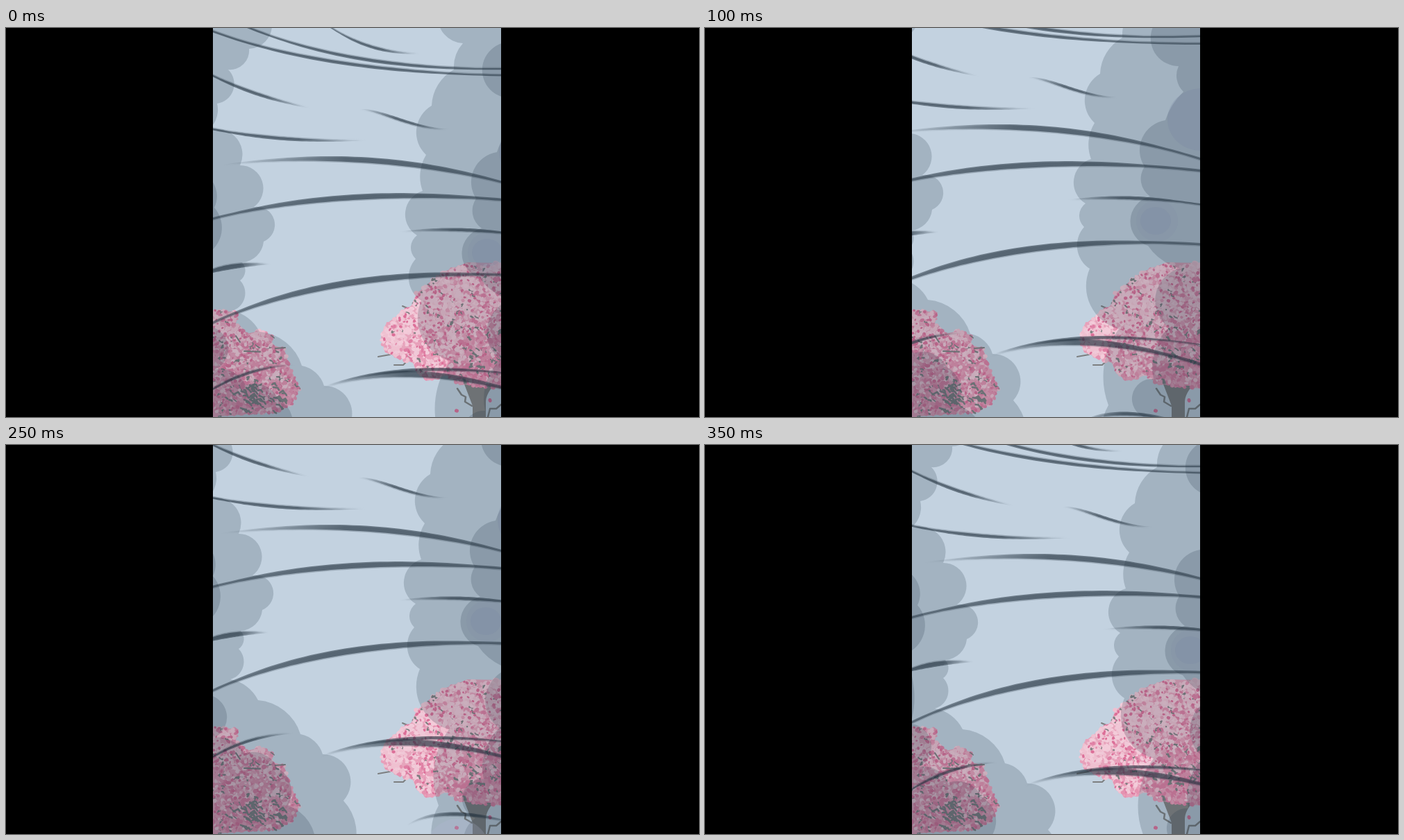
Recreate the animation shown at these times as an HTML page with a canvas. Size 998 by 561 pixels, loop 400 ms.

```html
<!DOCTYPE html>
<html lang="en">
<head>
<meta charset="utf-8">
<title>Wind and blossom</title>
<style>
  html, body { margin: 0; width: 100%; height: 100%; overflow: hidden; background: #000; }
  canvas { display: block; }
</style>
</head>
<body>
<canvas id="stage" width="998" height="561"></canvas>
<script>
const ctx = document.getElementById('stage').getContext('2d');
const LEFT = 298, RIGHT = 713, HEIGHT = 561;

// The whole storm layer jumps to one of these offsets every 50 ms.
const SHAKE = [[0, 0], [-43, -16], [-44, -46], [-45, -76], [-23, -91], [-2, -70], [18, -49], [6, -28]];

let seed = 7;
function random() {
  seed = (seed * 16807) % 2147483647;
  return seed / 2147483647;
}
const between = (a, b) => a + (b - a) * random();
const pick = list => list[Math.floor(random() * list.length)];

const layers = [];

// A cloud edge runs downwards; each point is [x, y, height of the bump leading to it].
function cloud(wall, edge) {
  const sweep = wall < LEFT ? 1 : 0;
  let [px, py] = edge[0], d = `M${wall} ${py}L${px} ${py}`;
  for (const [x, y, bump] of edge.slice(1)) {
    const chord = Math.hypot(x - px, y - py), r = (chord * chord / 4 + bump * bump) / (2 * bump);
    d += `A${r} ${r} 0 ${bump > chord / 2 ? 1 : 0} ${sweep} ${x} ${y}`;
    [px, py] = [x, y];
  }
  layers.push([new Path2D(`${d}L${wall} ${py}Z`), 'rgba(35,55,72,.2)']);
}

function puff(x, y, rx, ry, fill) {
  const path = new Path2D();
  path.ellipse(x, y, rx, ry, 0, 0, 7);
  layers.push([path, fill]);
}

cloud(250, [[383, -5], [350, 30, 10], [320, 60, 10], [304, 109, 16], [285, 151, 8], [337, 198, 26],
  [357, 258, 23], [371, 308, 23], [340, 338, 8], [337, 364, 6], [325, 408, 13],
  [365, 438, 6], [426, 487, 12], [458, 516, 6], [488, 583, 24], [500, 660, 12]]);
cloud(250, [[270, 205], [300, 259, 16], [280, 330, 20], [290, 430, 10], [302, 492, 24],
  [345, 515, 8], [392, 535, 10], [408, 590, 12], [448, 650, 12]]);
cloud(800, [[622, -20], [658, 22, 12], [645, 60, 4], [613, 112, 8], [605, 183, 18], [600, 235, 6],
  [592, 299, 21], [590, 333, 8], [598, 393, 14], [640, 480, 22], [625, 590, 14], [620, 660, 8]]);
cloud(800, [[745, 25], [726, 101, 50], [733, 138, 6], [707, 179, 3], [677, 246, 20], [685, 289, 9],
  [682, 360, 27], [758, 394, 12], [712, 478, 42], [690, 552, 10], [678, 608, 25], [665, 660, 10]]);
puff(758, 178, 48, 45, 'rgba(116,128,158,.25)');
puff(652, 660, 48, 51, 'rgba(180,185,215,.2)');
puff(695, 324, 30, 30, 'rgba(120,135,160,.14)');
puff(693, 324, 22, 20, 'rgba(116,128,158,.2)');

const SAMPLES = 48;
const curve = (a, m, b) => t => a * (1 - t) * (1 - 2 * t) + m * 4 * t * (1 - t) + b * t * (2 * t - 1);
const swoop = (a, b) => t => a + (b - a) * t * t * (3 - 2 * t);

// A tapered dark ribbon with a thinner-toned twin beside it; a and b are the strengths of the ends.
function ribbon(width, a, b, xAt, yAt) {
  for (const [shift, alpha] of [[0, 0.55], [a > b ? -1.5 : 1.5, 0.24]]) {
    const path = new Path2D();
    const edge = (t, side) => {
      const half = width / 2 * Math.max(Math.sin(Math.PI * t), t < 0.5 ? a : b);
      path.lineTo(xAt(t), yAt(t) + side * half + shift);
    };
    for (let i = 0; i <= SAMPLES; i++) edge(i / SAMPLES, -1);
    for (let i = SAMPLES; i >= 0; i--) edge(i / SAMPLES, 1);
    const fill = ctx.createLinearGradient(xAt(0), 0, xAt(1), 0);
    const stop = (t, k) => fill.addColorStop(t, `rgba(30,45,58,${alpha * k})`);
    stop(0, a && 0.4 + a);
    stop(0.4, 1);
    stop(0.6, 1);
    stop(1, b && 0.4 + b);
    layers.push([path, fill]);
  }
}

// Passes through a start, a middle and an end point.
const wind = (width, a, b, x0, y0, xm, ym, x1, y1) =>
  ribbon(width, a, b, curve(x0, xm, x1), curve(y0, ym, y1));

wind(4, 0.5, 0, 460, -6, 525, 27, 597, 37);
wind(4.5, 0.6, 0.5, 325, -11, 520, 46, 762, 58);
wind(4.5, 0.6, 0.5, 270, -6, 480, 50, 762, 69);
wind(4.5, 0.6, 0, 275, 57, 352, 92, 440, 116);
ribbon(4, 0, 0, curve(508, 566, 640), swoop(117, 146));
wind(4.5, 0.6, 0, 275, 141, 390, 159, 522, 162);
wind(8, 0, 0.4, 306, 198, 540, 192, 762, 236);
wind(8, 0.4, 0.45, 275, 281, 500, 244, 762, 252);
wind(4.5, 0, 0.5, 565, 294, 660, 291, 762, 301);
wind(7, 0.6, 0, 270, 360, 322, 345, 382, 341);
wind(9, 0.4, 0.4, 275, 436, 490, 368, 762, 358);
wind(4, 0.6, 0, 270, 540, 340, 501, 418, 486);
wind(4.5, 0, 0.4, 452, 519, 590, 493, 762, 503);
wind(9, 0, 0.5, 452, 521, 590, 499, 762, 532);
wind(5, 0, 0, 577, 620, 645, 602, 750, 619);

// Trees stand still, so they are painted once.
const grove = document.createElement('canvas');
grove.width = 998;
grove.height = HEIGHT;
const g = grove.getContext('2d');

function petal(x, y, color, size) {
  g.fillStyle = color;
  g.beginPath();
  g.ellipse(x, y, size, size * between(0.55, 0.9), random() * Math.PI, 0, 7);
  g.fill();
}

function twig(d, width) {
  g.strokeStyle = '#7d7f80';
  g.lineWidth = width;
  g.stroke(new Path2D(d));
}

function scatter(outline, [x0, y0, x1, y1], count, draw) {
  while (count > 0) {
    const x = between(x0, x1), y = between(y0, y1);
    if (!g.isPointInPath(outline, x, y)) continue;
    draw(x, y);
    count--;
  }
}

function crown(d, box, count, depthAt) {
  const outline = new Path2D(d);
  const pale = ['#f3cbd9', '#efc0d0', '#f0c8d7'], deep = ['#e592b0', '#df7fa4', '#e8a0ba'];
  const leaf = (x, y, size) => petal(x, y, pick(random() < depthAt(x, y) ? deep : pale), size);
  g.fillStyle = '#e6a5bc';
  g.fill(outline);
  scatter(outline, box, count, (x, y) => leaf(x, y, between(2.5, 4.8)));
  scatter(outline, box, count / 7, (x, y) => {
    if (random() > depthAt(x, y) + 0.1) return;
    const turn = random() * 7, dx = 4 * Math.cos(turn), dy = 4 * Math.sin(turn);
    twig(`M${x} ${y}l${dx} ${dy}l${dy * 0.6} ${dx * 0.4}`, between(1.5, 3));
  });
  scatter(outline, box, count / 2.2, (x, y) => leaf(x, y, between(2, 3.8)));
  scatter(outline, box, count / 9, (x, y) => petal(x, y, '#dc6f98', between(1.5, 2.8)));
}

const clamp = (v, low, high) => Math.min(high, Math.max(low, v));

function paintTrees() {
  g.lineCap = g.lineJoin = 'round';
  twig('M536 474L553 471M559 486L572 486L577 481M571 401L578 404', 2);
  twig('M650 520L656 529L662 532L661 539L671 545M713 543L706 549L697 549L694 561', 2.5);
  g.fillStyle = '#808080';
  g.fill(new Path2D('M654 498L672 545V561H691V538Q692 523 713 505V490Z'));
  crown('M540 446L547 427L584 400L591 383L629 352L665 338L713 339V520L652 513L632 499L612 508L592 498L586 483L546 468Z',
    [536, 334, 713, 525], 1350, (x, y) => clamp((x - 560) / 330 + (y - 410) / 180, 0.12, 0.85));
  crown('M298 407L335 410L331 426L346 441L365 437L386 444L382 457L400 462L409 490L423 520L413 540L395 553L298 561Z',
    [298, 403, 426, 561], 850, (x, y) => clamp(0.35 + (y - 420) / 260, 0.25, 0.8));
  scatter(new Path2D('M325 515L390 510L402 535L380 552L330 556Z'), [320, 510, 405, 556], 38,
    (x, y) => twig(`M${x} ${y}l${between(3, 7)} ${between(-4, 4)}l2 3`, 2.5));
  twig('M331 444L337 453M343 466L366 467M388 462L402 461', 2);
  petal(649, 552, '#dc6f98', 3);
  petal(697, 537, '#dc6f98', 3);
}
paintTrees();

function draw(time) {
  const [dx, dy] = SHAKE[Math.floor(time / 50) % SHAKE.length];
  ctx.fillStyle = '#000';
  ctx.fillRect(0, 0, 998, HEIGHT);
  ctx.save();
  ctx.beginPath();
  ctx.rect(LEFT, 0, RIGHT - LEFT, HEIGHT);
  ctx.clip();
  ctx.fillStyle = '#c3d2e0';
  ctx.fillRect(LEFT, 0, RIGHT - LEFT, HEIGHT);
  ctx.drawImage(grove, 0, 0);
  ctx.translate(dx, dy);
  for (const [path, fill] of layers) {
    ctx.fillStyle = fill;
    ctx.fill(path);
  }
  ctx.restore();
}

function tick() {
  draw(performance.now());
  requestAnimationFrame(tick);
}
tick();
</script>
</body>
</html>
```
